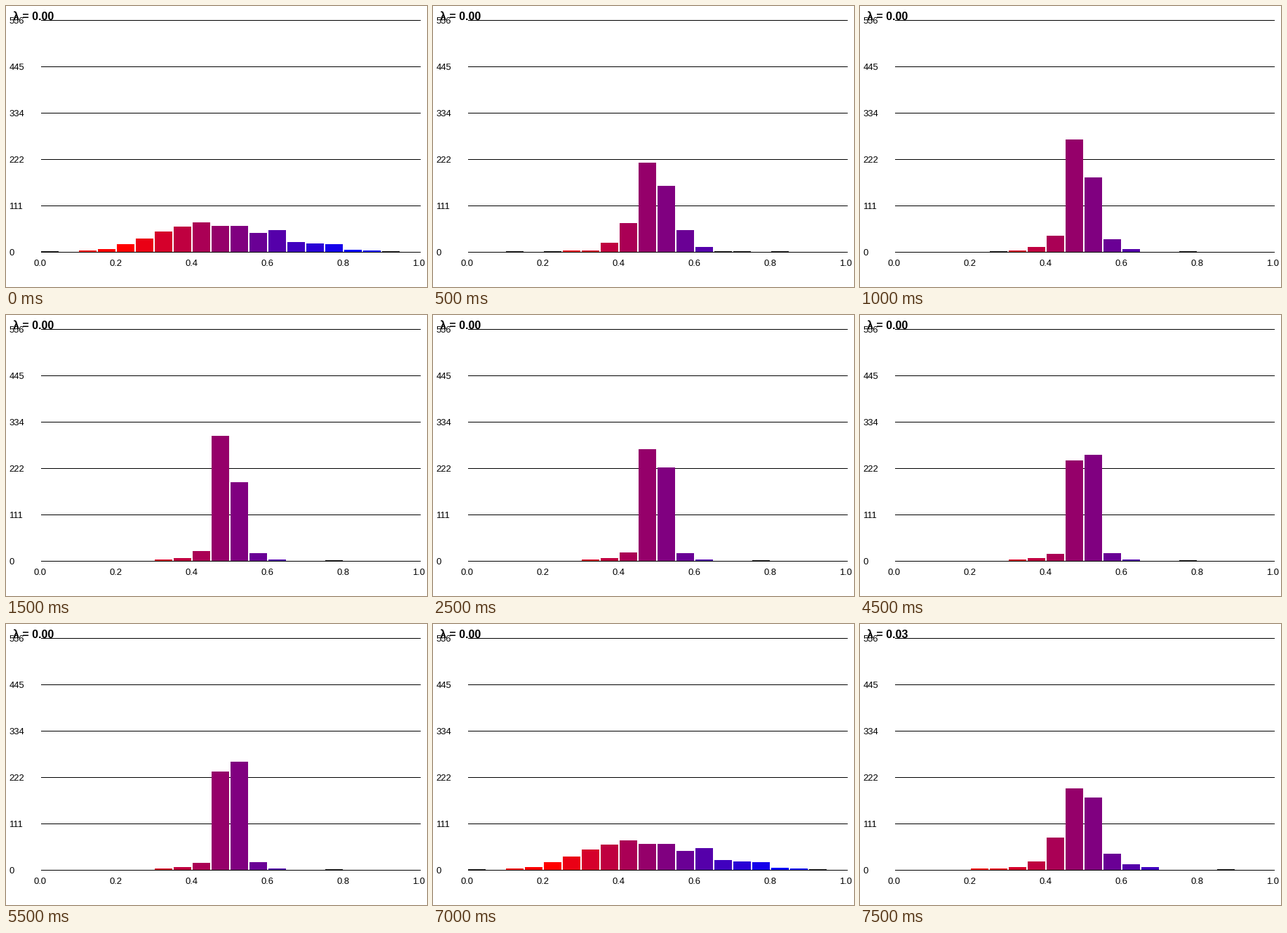
A matplotlib script for the animation above (8000 ms loop, 600 by 400 pixels).

```python
import matplotlib.pyplot as plt
import numpy as np
from matplotlib.animation import FuncAnimation
from matplotlib.patches import Rectangle

W, H, DPI = 600, 400, 100
LEFT, BASE, STEP, BAR_W, BINS = 50, 350, 27, 25, 20
FRAMES, INTERVAL = 16, 500
DECAY = 0.74

plt.rcParams["font.family"] = "Liberation Sans"


def heights(first, *values):
    """Bar heights in pixels, starting at bin `first`."""
    bars = np.zeros(BINS)
    bars[first:first + len(values)] = values
    return bars


INITIAL = heights(0, 1, 0, 2, 4, 11, 19, 29, 36, 42, 37, 37, 27, 31, 14, 12, 11, 3, 2, 1)
SPREAD = heights(2, 1, 0, 1, 2, 2, 13, 41, 127, 94, 31, 7, 1, 1, 0, 1)
PEAKED = heights(6, 2, 4, 14, 178, 112, 11, 2, 0, 0, 1)
SETTLED = heights(6, 2, 4, 10, 140, 154, 11, 2, 0, 0, 1)
NEXT_RUN = heights(4, 2, 2, 4, 12, 46, 116, 103, 23, 8, 4, 0, 0, 0, 1)


def histogram(step):
    if step in (0, 14):
        return INITIAL
    if step == 15:
        return NEXT_RUN
    if step <= 3:
        share = (0, 0.65, 1)[step - 1]
        return np.round(SPREAD + (PEAKED - SPREAD) * share)
    # The two middle bins trade counts ever more slowly, then stop.
    k = min(step - 3, 8)
    share = (1 - DECAY ** k) / (1 - DECAY ** 8)
    return np.round(PEAKED + (SETTLED - PEAKED) * share)


def bin_color(i):
    t = np.clip((i - 4) / 12, 0, 1)
    return (1 - t, 0, t)


fig = plt.figure(figsize=(W / DPI, H / DPI), dpi=DPI, facecolor="white")
ax = fig.add_axes([0, 0, 1, 1])
ax.set_xlim(0, W)
ax.set_ylim(H, 0)
ax.axis("off")


def box(x, y, w, h, color, z):
    return ax.add_patch(Rectangle((x, y), w, h, facecolor=color, linewidth=0,
                                  antialiased=False, zorder=z))


def label(x, y, text, size=13, **style):
    return ax.text(x, y, text, fontsize=size * 72 / DPI, color="black",
                   va="baseline", zorder=4, **style)


for n in range(6):
    y = BASE - 66 * n
    box(LEFT, y, 541, 1, "black", 1)
    label(4.5, y + 5, f"{111.2 * n:.0f}")
    label(39.5 + 108 * n, 370, f"{n / 5:.1f}")

title = label(9.5, 20, "", size=16, weight="bold")
bars = [box(LEFT + STEP * i, BASE, BAR_W, 0, bin_color(i), 2) for i in range(BINS)]


def update(step):
    for i, (bar, h) in enumerate(zip(bars, histogram(step))):
        bar.set_y(BASE - h)
        bar.set_height(h)
        bar.set_visible(h > 0)
        bar.set_facecolor("#222222" if h == 1 else bin_color(i))
    title.set_text(f"λ = {0.03 if step == 15 else 0:.2f}")
    return [*bars, title]


anim = FuncAnimation(fig, update, frames=FRAMES, interval=INTERVAL,
                     repeat=True, repeat_delay=0)
plt.show()
```
